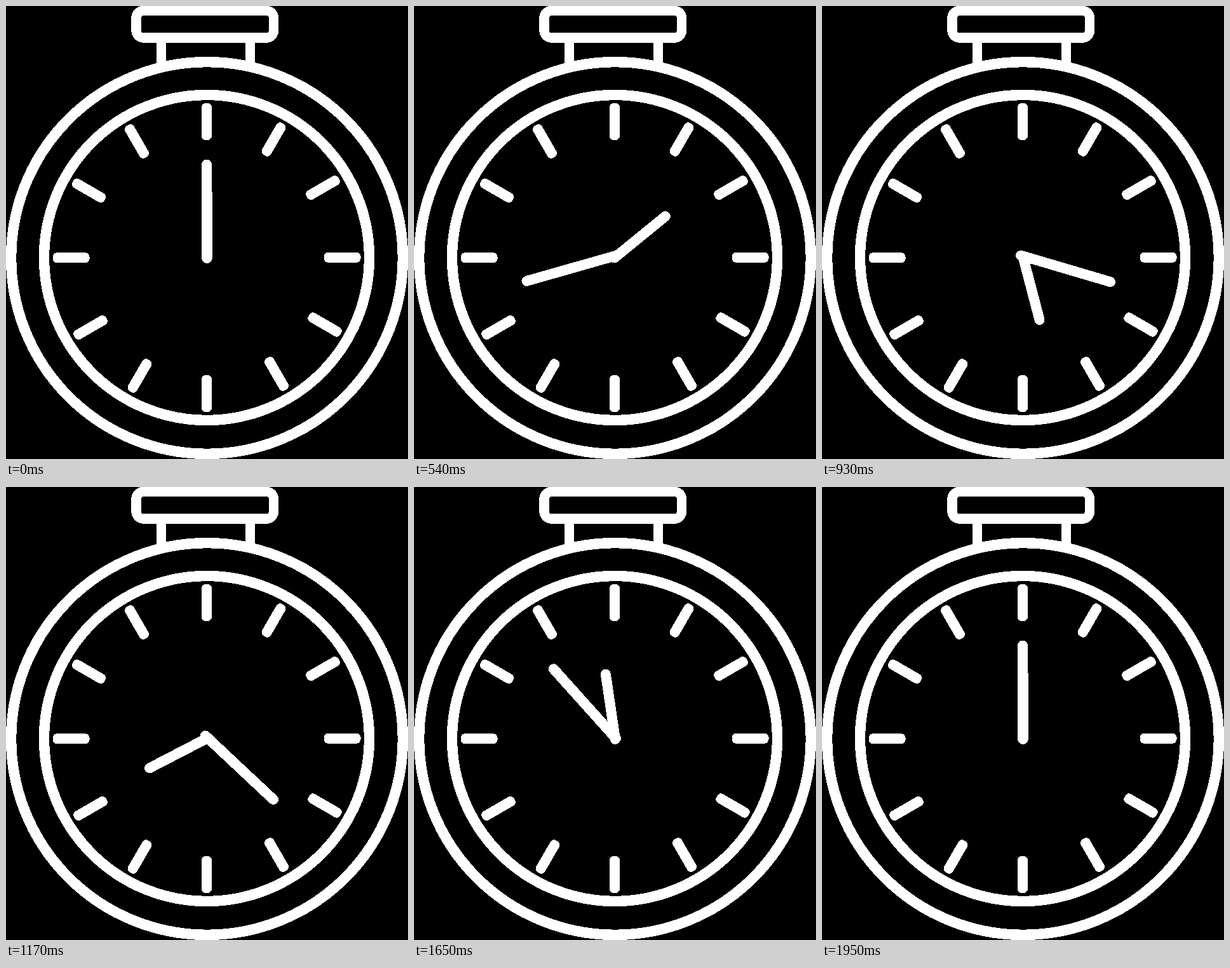
An HTML page that plays this animation: 633 px wide and 713 px high, repeating every 2700 ms.

```html
<!DOCTYPE html>
<html lang="en">
<head>
<meta charset="utf-8">
<title>Stopwatch</title>
<style>
  html, body { margin: 0; width: 100%; height: 100%; overflow: hidden; background: #000; }
  svg { display: block; width: 633px; height: 713px; shape-rendering: crispEdges; }
  .line { fill: none; stroke: #fff; stroke-width: 16; }
  .ring { stroke-width: 16.5; }
  .crown { stroke-width: 15.5; }
  .hand { stroke-linecap: round; }
  #crown, #case { fill: #000; }
  #ticks { fill: #fff; }
</style>
</head>
<body>
<svg viewBox="0 0 633 713">
  <defs><rect id="tick" x="-8" y="-29" width="16" height="58" rx="6.5"/></defs>
  <path class="line crown" d="M244.7 96V58Q244.7 50 252 50H377Q384.5 50 384.5 58V96"/>
  <rect id="crown" class="line crown" x="205" y="7.5" width="216.5" height="42.5" rx="11.5"/>
  <circle id="case" class="line ring" cx="316.5" cy="396.5" r="308.4"/>
  <circle class="line ring" cx="316" cy="396" r="256"/>
  <g id="ticks">
    <use href="#tick" transform="translate(316 182)"/>
    <use href="#tick" transform="translate(421.5 210) rotate(30)"/>
    <use href="#tick" transform="translate(499 286) rotate(60)"/>
    <use href="#tick" transform="translate(529.5 395.7) rotate(90)"/>
    <use href="#tick" transform="translate(502 501.5) rotate(120)"/>
    <use href="#tick" transform="translate(426 579) rotate(150)"/>
    <use href="#tick" transform="translate(316 610)"/>
    <use href="#tick" transform="translate(210.5 582) rotate(30)"/>
    <use href="#tick" transform="translate(133 506) rotate(60)"/>
    <use href="#tick" transform="translate(102.5 396.3) rotate(90)"/>
    <use href="#tick" transform="translate(130.5 290.5) rotate(120)"/>
    <use href="#tick" transform="translate(206 213) rotate(150)"/>
  </g>
  <g transform="translate(316.7 395.5)"><path id="hour" class="line hand" d="M0 1.5V-102"/></g>
  <g transform="translate(316 393.5)"><path id="minute" class="line hand" d="M0 3V-144"/></g>
</svg>
<script>
  const LOOP = 2700, STEP = 30, LAST = 65;
  const PRESS = 5, DEPTH = 16;
  const [crown, hour, minute] = ['crown', 'hour', 'minute'].map(id => document.getElementById(id));

  // Smooth ease from 0 to 1 while n runs from a to b
  const ease = (n, a, b) => {
    const p = Math.min(1, Math.max(0, (n - a) / (b - a)));
    return p * p * (3 - 2 * p);
  };

  // Down and back up, lowest at step n = mid
  const push = (n, mid) => ease(n, mid - PRESS, mid) - ease(n, mid, mid + PRESS);

  const start = performance.now();

  function draw() {
    const t = Math.max(0, performance.now() - start) % LOOP;
    const n = Math.min(LAST, Math.floor(t / STEP));
    const turn = 360 * ease(n, PRESS, LAST - PRESS);
    const drop = DEPTH * (push(n, PRESS) + push(n, LAST - PRESS));
    hour.setAttribute('transform', `rotate(${turn})`);
    minute.setAttribute('transform', `rotate(${turn * 5})`);
    crown.setAttribute('transform', `translate(0 ${drop})`);
    requestAnimationFrame(draw);
  }
  draw();
</script>
</body>
</html>
```
